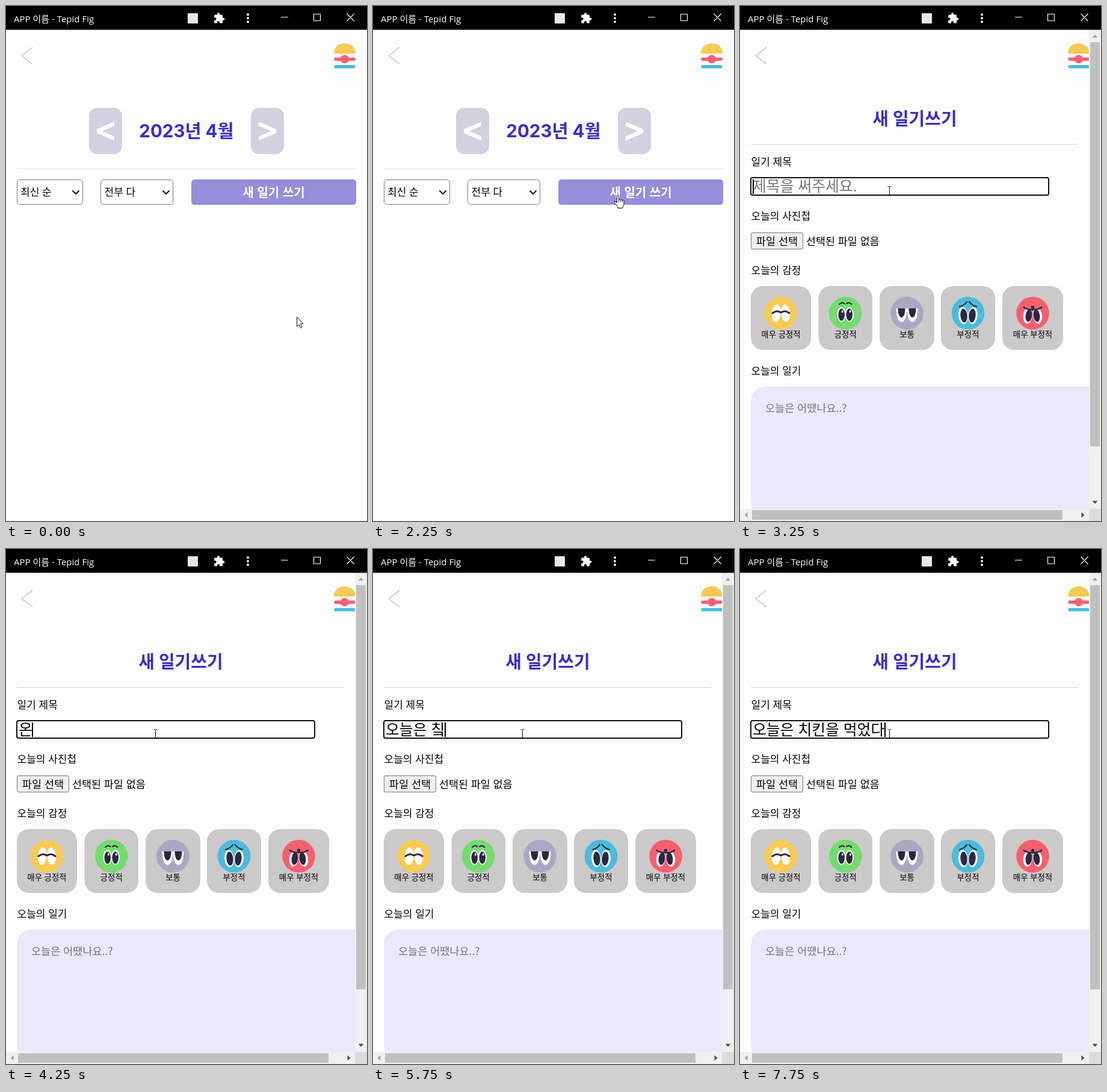
Recreate the animation shown at these times as an HTML page. Size 600x855 px, loop 8 s.

```html
<!DOCTYPE html>
<html lang="ko">
<head>
<meta charset="utf-8">
<style>
html, body { margin: 0; width: 100%; height: 100%; overflow: hidden; background: #fefdfe; }
svg { display: block; width: 600px; height: 855px; }
text { font: 17px 'Noto Sans CJK KR', 'Noto Sans CJK', sans-serif; white-space: pre; }
.mid { text-anchor: middle; }
.bar { font: 15px 'Open Sans', 'Noto Sans CJK KR', 'Noto Sans CJK', sans-serif; fill: #fff; }
.head { font: 700 29.5px Inter, 'Noto Sans CJK KR', 'Noto Sans CJK', sans-serif; fill: #3a2dc4; }
.write { font-size: 20px; font-weight: 700; fill: #fff; }
.big { font-size: 24.8px; }
.hint { fill: #757575; }
.mood { font-size: 13.4px; }
.line { fill: none; stroke-linecap: round; stroke-linejoin: round; }
</style>
</head>
<body>
<svg viewBox="0 0 600 855">
  <defs>
    <clipPath id="view"><rect y="39" width="580" height="796"/></clipPath>
    <g id="nav">
      <path class="line" d="M43.500 69L26 82.500 43.500 96" stroke="#cdd0d8" stroke-width="2"/>
      <path d="M545 77C547 57 579 57 581 77Q581 79 579 79H547Q545 79 545 77Z" fill="#f7c955"/>
      <path class="line" d="M548 88.300H578" stroke="#f4606f" stroke-width="5.500"/>
      <circle cx="563" cy="88.300" r="7" fill="#f4606f"/>
      <path class="line" d="M548 100.800H578" stroke="#4dbbda" stroke-width="5.500"/>
    </g>
    <g id="step">
      <rect x="138" y="169" width="55" height="77" rx="14" fill="#d0d2df"/>
      <path d="M180 192V199L160 207.500 180 216.500V223.500L151 211V204.500Z" fill="#fff"/>
    </g>
    <path id="drop" class="line" d="M-5 -2.500L0 2.500 5 -2.500" stroke="#111" stroke-width="2"/>
  </defs>
  <rect width="600" height="855" fill="#fefdfe"/>

  <g id="list">
    <use href="#nav"/>
    <use href="#step"/>
    <use href="#step" transform="translate(600) scale(-1 1)"/>
    <text class="head mid" x="300" y="218">2023년 4월</text>
    <path d="M18 270H582" stroke="#dcdce6"/>
    <g fill="#fff" stroke="#767676">
      <rect x="18.500" y="288.500" width="109" height="41" rx="5"/>
      <rect x="157.500" y="288.500" width="120" height="41" rx="5"/>
    </g>
    <text x="24" y="315">최신 순</text>
    <text x="163.500" y="315">전부 다</text>
    <use href="#drop" x="116" y="309.500"/>
    <use href="#drop" x="266" y="309.500"/>
    <rect x="308" y="288" width="274" height="42" rx="5" fill="#958edb"/>
    <text class="write mid" x="445" y="316.500">새 일기 쓰기</text>
  </g>

  <g id="form">
    <g clip-path="url(#view)">
      <use href="#nav"/>
      <text class="head mid" x="290.500" y="198" style="font-size:29px">새 일기쓰기</text>
      <path d="M18 230H562" stroke="#dcdce6" stroke-width="1.500"/>
      <text x="18.500" y="265">일기 제목</text>
      <text x="18.500" y="355">오늘의 사진첩</text>
      <rect x="18.500" y="376.500" width="86" height="27" rx="2.500" fill="#efefef" stroke="#767676"/>
      <text class="mid" x="61.500" y="396.500" style="font-size:17.500px">파일 선택</text>
      <text x="110" y="396.500" style="font-size:17.400px">선택된 파일 없음</text>
      <text x="18.500" y="445">오늘의 감정</text>
      <g id="moods"></g>
      <text x="18.500" y="612">오늘의 일기</text>
      <rect x="18" y="632" width="620" height="216" rx="24" fill="#e9e8fd"/>
      <text class="hint" x="42" y="673.500" style="font-size:17.500px">오늘은 어땠나요..?</text>
      <rect id="ring" x="18" y="285" width="495" height="29" rx="3" fill="#fff" stroke="#101010" stroke-width="2"/>
      <text id="hint" class="big hint" x="21" y="307.500">제목을 써주세요.</text>
      <text id="typed" class="big" x="21" y="309"></text>
      <rect id="caret" y="288" width="2" height="24"/>
    </g>
    <path d="M580 39H600V835H580ZM0 835H580V855H0Z" fill="#f1f0f1"/>
    <rect x="580" y="835" width="20" height="20" fill="#dcdcdc"/>
    <path d="M582 60H598V731H582ZM20 837H536V853H20Z" fill="#c1c0c1"/>
    <path d="M585.500 52.500H594.500L590 47.500ZM12.500 840.500V849.500L7.500 845Z" fill="#a3a3a3"/>
    <path d="M585.500 821.500H594.500L590 826.500ZM567.500 840.500V849.500L572.500 845Z" fill="#505050"/>
  </g>

  <rect width="600" height="39.500"/>
  <text class="bar" x="13" y="27">APP 이름 - Tepid Fig</text>
  <rect x="302" y="12" width="17" height="17" rx="1" fill="#e8e8e8"/>
  <path transform="translate(344.500 10.500) scale(.82)" fill="#fff" d="M20.500 11H19V7c0-1.100-.9-2-2-2h-4V3.500C13 2.100 11.900 1 10.500 1S8 2.100 8 3.500V5H4c-1.100 0-2 .9-2 2v3.800h1.500c1.500 0 2.700 1.200 2.700 2.700s-1.200 2.700-2.700 2.700H2V20c0 1.100.9 2 2 2h3.800v-1.500c0-1.500 1.200-2.700 2.700-2.700s2.700 1.200 2.700 2.700V22H17c1.100 0 2-.9 2-2v-4h1.500c1.400 0 2.500-1.100 2.500-2.500S21.900 11 20.500 11z"/>
  <path class="line" d="M402 14.300h0M402 20.300h0M402 26.300h0" stroke="#fff" stroke-width="4"/>
  <path d="M457 18.500H469M511.500 13.500H522.500V24.500H511.500ZM566.500 13L578.500 25M578.500 13L566.500 25" fill="none" stroke="#fff" stroke-width="1.200"/>

  <g id="pointer" stroke="#111" stroke-linejoin="round">
    <path id="arrow" fill="#fff" d="M.5 .5V16L4 12.700 6.500 18.500 9 17.500 6.500 11.700H11Z"/>
    <path id="hand" fill="#fff" d="M-1.500 1.500Q0 -.5 1.500 1.500V8Q3 6.500 4.500 8.500 6 7 7.500 9 9 8 10 10V15Q10 18 8 20V22H0V20L-5.500 13Q-6.500 10 -4 11L-1.500 13ZM1.500 8V12M4.500 8.500V12M7.500 9V12"/>
    <path id="beam" fill="none" stroke="#000" d="M-3 -7H-1L0 -6 1 -7H3M0 -6V7M-3 7H3"/>
  </g>
</svg>
<script>
const $ = id => document.getElementById(id);
const INK = '#2b2740';
const eye = (x, y, rx, ry, fill, tilt = 0) =>
  `<ellipse rx="${rx}" ry="${ry}" fill="${fill}" transform="translate(${x} ${y}) rotate(${tilt})"/>`;
const pair = draw => draw(-1) + draw(1);
const stroke = (d, w) => `<path class="line" d="${d}" stroke="${INK}" stroke-width="${w}"/>`;

// Left edge, width, label, colour, features around the face centre
const moods = [
  [18, 100, '매우 긍정적', '#f7c955',
    pair(s => eye(s * 7.7, 0, 7.3, 14.5, '#fff', -s * 5)) +
    stroke('M-14 0Q-7 -6 0 -1Q7 -6 14 0', 3)],
  [130.5, 89.5, '긍정적', '#74db6f',
    pair(s => eye(s * 6.7, 2, 7, 12.5, '#fff') + eye(s * 6.5, 2.5, 5.3, 10.3, INK) +
      eye(s * 6.5 + 1.5, -3, 1.4, 2.2, '#fff')) +
    stroke('M-10 -15Q-6 -19 -2 -16M2 -16Q6 -19 10 -15', 2.2)],
  [232, 91, '보통', '#a9a8c4',
    pair(s => `<g transform="translate(${s * 9} -8)"><path d="M-9 0H9C9 30 -9 30 -9 0Z" fill="#fff"/>
      <path d="M-6 0H6C6 20 -6 20 -6 0Z" fill="${INK}"/></g>`)],
  [334, 90, '부정적', '#4dbbdb',
    pair(s => eye(s * 8, 4, 7.8, 14.3, '#fff', s * 5) + eye(s * 7, 4, 5.6, 11.5, INK, s * 5)) +
    stroke('M-14 -11Q-6 -13 -2 -19M2 -19Q6 -13 14 -11', 2.2)],
  [436, 101, '매우 부정적', '#f4606f',
    pair(s => eye(s * 8, 4, 7.5, 13.5, '#fff', -s * 7) + eye(s * 6.5, 4, 5.3, 10.5, INK, -s * 7)) +
    '<path d="M-16 -10Q-8 -5 0 -6Q8 -5 16 -10V-14H-16Z" fill="#f4606f"/>' +
    stroke('M-15 -10Q-8 -5 0 -6Q8 -5 15 -10', 2.4) + eye(0, -9.5, 2.8, 2.8, INK)]
];
$('moods').innerHTML = moods.map(([x, w, label, color, face]) => {
  const cx = x + w / 2;
  return `<rect x="${x}" y="465" width="${w}" height="106" rx="20" fill="#cbc9ca"/>
    <g transform="translate(${cx} 510)"><circle r="27.3" fill="${color}"/>${face}</g>
    <text class="mood mid" x="${cx}" y="550">${label}</text>`;
}).join('');

const LOOP = 8000, TICK = 125, OPEN = 19, FOCUS = 26, TYPE = 32;
const A = '오늘은 ', B = A + '치킨을 ';
// One entry per tick; a repeated entry is a pause
const keys = ['ㅇ', '오', '온', '오느', '오늘', '오늘ㅇ', '오늘ㅇ', '오늘으', '오늘은', '오늘은', A, A]
  .concat(['ㅊ', '치', '칰', '치키', '치킨', '치킨ㅇ', '치킨으', '치킨을', '치킨을 '].map(s => A + s))
  .concat(['ㅁ', '머', '먹', '먹ㅇ', '먹어', '먹었', '먹었ㄷ', '먹었다'].map(s => B + s));

// Tick, x, y
const path = [[0, 483, 516], [6, 418, 409], [7, 415, 420], [8, 414, 412], [11, 410, 345],
  [12, 410, 345], [15, 407, 314], [18, 407, 313.5], [19, 409.5, 322.5], [20, 403.5, 322],
  [25, 248.5, 306.5], [64, 248.5, 306.5]];

function pointAt(k) {
  const i = path.findIndex(p => p[0] > k);
  const [a, b] = [path[i - 1], path[i]];
  const u = (k - a[0]) / (b[0] - a[0]);
  return [a[1] + (b[1] - a[1]) * u, a[2] + (b[2] - a[2]) * u];
}

const show = (id, on) => { $(id).style.display = on ? '' : 'none'; };

function render(ms) {
  const k = Math.floor(ms % LOOP / TICK);
  const form = k >= OPEN;
  show('list', !form);
  show('form', form);

  const [x, y] = pointAt(k);
  $('pointer').setAttribute('transform', `translate(${x} ${y})`);
  const hand = !form && y < 330;
  show('arrow', !form && !hand);
  show('hand', hand);
  show('beam', form);

  const text = k < TYPE ? '' : keys[Math.min(k - TYPE, keys.length - 1)];
  $('typed').textContent = text;
  show('hint', !text);
  show('ring', k >= FOCUS);
  show('caret', k >= FOCUS && (k < FOCUS + 4 || k >= TYPE));
  const end = text ? $('typed').getComputedTextLength() : 0;
  $('caret').setAttribute('x', Math.floor(21 + end));
}

const start = performance.now();
function loop() {
  render(performance.now() - start);
  requestAnimationFrame(loop);
}
render(0);
requestAnimationFrame(loop);
</script>
</body>
</html>
```
